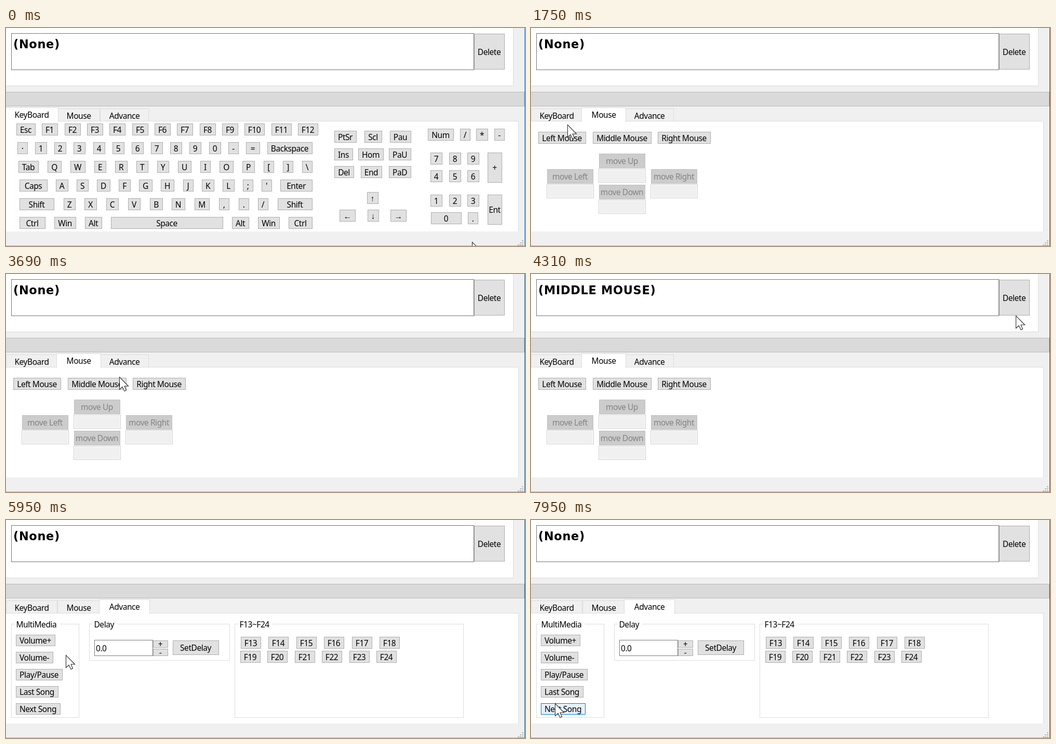
An HTML page that plays this animation: 999x420 px, repeating every 8000 ms.

```html
<!DOCTYPE html>
<html lang="en">
<head>
<meta charset="utf-8">
<title>Key mapping panel</title>
<style>
  html, body { margin: 0; width: 100%; height: 100%; overflow: hidden; background: #f0f0f0; }
  svg { display: block; }
  text { font: 15.5px "Noto Sans", "Open Sans", sans-serif; letter-spacing: -.45px; fill: #000; white-space: pre; }
  .mid { text-anchor: middle; }
  .off { fill: #838383; }
  #entry { font: bold 22.4px "DejaVu Sans", sans-serif; letter-spacing: .7px; }
  .hover > rect { fill: #e5f1fb; stroke: #0078d7; }
</style>
</head>
<body>
<svg id="stage" width="999" height="420" viewBox="0 0 999 420"></svg>
<script>
const stage = document.getElementById('stage');

function add(parent, tag, attrs = {}, content = '') {
  const el = document.createElementNS('http://www.w3.org/2000/svg', tag);
  for (const key in attrs) el.setAttribute(key, attrs[key]);
  el.textContent = content;
  return parent.appendChild(el);
}
const group = parent => add(parent, 'g');
const fill = (parent, x, y, width, height, color) =>
  add(parent, 'rect', { x, y, width, height, fill: color });
const box = (parent, x, y, w, h, color, stroke) =>
  add(parent, 'rect', { x: x + .5, y: y + .5, width: w - 1, height: h - 1, fill: color, stroke });
const label = (parent, x, y, str, cls = '') => add(parent, 'text', { x, y, class: cls }, str);

function button(parent, x, y, w, h, str, disabled) {
  const g = group(parent);
  box(g, x, y, w, h, disabled ? '#cccccc' : '#e1e1e1', disabled ? '#bfbfbf' : '#adadad');
  label(g, x + w / 2 - .5, y + h / 2 + 6, str, disabled ? 'mid off' : 'mid');
  return g;
}

// A key is as wide as its label plus padding.
const probe = label(stage, 0, -20, '');
function keyWidth(str) {
  probe.textContent = str;
  return Math.max(20, Math.round(probe.getComputedTextLength()) + 15);
}

// Spreads keys evenly from x to end; "label:width" sets a wider key.
function row(parent, x, end, y, keys, separator = ' ') {
  const list = keys.split(separator).map(key => {
    const [, str, width] = key.match(/^(.+?)(?::(\d+))?$/);
    return { str, w: width ? +width : keyWidth(str) };
  });
  const used = list.reduce((sum, key) => sum + key.w, 0);
  const gap = (end - x - used) / Math.max(1, list.length - 1);
  return list.map(({ str, w }) => {
    const key = button(parent, Math.round(x), y, w, 23, str);
    x += w + gap;
    return key;
  });
}

function groupBox(parent, x, y, w, h, title) {
  box(parent, x, y, w, h, 'none', '#dcdcdc');
  fill(parent, x + 7, y, keyWidth(title) - 6, 1, '#fff');
  label(parent, x + 9.5, y + 7, title);
}

// Window
fill(stage, 0, 0, 999, 420, '#f0f0f0');
box(stage, -2, -2, 979, 114, '#fff', '#dcdcdc');
box(stage, 10, 10, 891, 71, '#fff', '#747474');
const entry = add(stage, 'text', { id: 'entry', x: 14, y: 39 });
const del = button(stage, 901, 11, 59, 69, 'Delete');
box(stage, -2, 123, 1000, 28, '#dadada', '#b9b9b9');
box(stage, -2, 179, 989, 230, '#fff', '#dcdcdc');
fill(stage, 0, 392, 998, 28, '#f0f0f0');
fill(stage, 0, 419, 998, 1, '#b4b4b4');
const edge = fill(stage, 998, 0, 1, 420, '#3f82b8');
for (let r = 0; r < 3; r++)
  for (let c = 0; c <= r; c++) fill(stage, 993 - 4 * c, 409 + 4 * r, 3, 2, '#b8b8b8');

// Each view holds the tab strip and the page it selects.
const tabNames = ['KeyBoard', 'Mouse', 'Advance'];
const tabEdges = [0, 99, 181, 275];
function makeView(selected) {
  const g = group(stage);
  const tab = i => {
    const on = i === selected, left = tabEdges[i], width = tabEdges[i + 1] - left;
    if (on) {
      box(g, left - 2, 153, width + 4, 28, '#fff', '#dcdcdc');
      fill(g, left - 1, 179, width + 2, 2, '#fff');
    } else {
      box(g, left, 155, width, 25, '#f0f0f0', '#dcdcdc');
    }
    label(g, left + width / 2, on ? 173 : 175, tabNames[i], 'mid');
  };
  [0, 1, 2].filter(i => i !== selected).forEach(tab);
  tab(selected);
  return g;
}
const views = [0, 1, 2].map(makeView);
const [keyboard, mouse, advance] = views;

// Keyboard page
const functionKeys = (from, count) => Array.from({ length: count }, (_, i) => 'F' + (from + i)).join(' ');
[
  'Esc ' + functionKeys(1, 12),
  '· 1 2 3 4 5 6 7 8 9 0 - =:27 Backspace',
  'Tab Q W E R T Y U I O P [ ] \\',
  "Caps:54 A S D F G H J K L ; ' Enter:62",
  'Shift:67 Z X C V B N M , . / Shift:67',
  'Ctrl:50 Win Alt Space:216 Alt Win Ctrl:46'
].forEach((keys, i) => row(keyboard, 20 + Math.min(6, 2 * i), i ? 590 : 601, 184 + 36 * i, keys));
['PtSr Scl Pau', 'Ins Hom PaU', 'Del End PaD']
  .forEach((keys, i) => row(keyboard, 632, 780, 198 + 34 * i, keys));
row(keyboard, 695, 718, 316, '↑');
row(keyboard, 642, 771, 350, '←:31 ↓ →:31');
row(keyboard, 812, 960, 194, 'Num / * -');
row(keyboard, 817, 911, 240, '7 8 9');
row(keyboard, 817, 911, 274, '4 5 6');
row(keyboard, 817, 911, 321, '1 2 3');
row(keyboard, 818, 909, 355, '0:59 .');
button(keyboard, 927, 240, 28, 58, '+');
button(keyboard, 927, 321, 28, 58, 'Ent');

// Mouse page
const [leftMouse, middleMouse] = row(mouse, 14, 346, 200, 'Left Mouse|Middle Mouse|Right Mouse', '|');
['Up', 'Left', 'Down', 'Right'].forEach((dir, i) => {
  const angle = (i + 1) * Math.PI / 2;
  const x = 131 + 100 * Math.round(Math.cos(angle)), y = 272 - 30 * Math.round(Math.sin(angle));
  button(mouse, x, y, 89, 28, 'move ' + dir, true);
  box(mouse, x - 1, y + 29, 91, 27, '#fff', '#cccccc');
  fill(mouse, x + 1, y + 31, 87, 23, '#f0f0f0');
});

// Advance page
groupBox(advance, 10, 200, 131, 181, 'MultiMedia');
const media = ['Volume+', 'Volume-', 'Play/Pause', 'Last Song', 'Next Song']
  .map((str, i) => button(advance, 19, 221 + 33 * i, keyWidth(str), 22, str));
groupBox(advance, 160, 200, 271, 71, 'Delay');
box(advance, 170, 231, 113, 31, '#fff', '#7a7a7a');
label(advance, 173, 253, '0.0');
button(advance, 283, 232, 29, 14, '+');
button(advance, 283, 248, 29, 14, '-');
button(advance, 321, 232, 89, 28, 'SetDelay');
groupBox(advance, 440, 200, 441, 181, 'F13~F24');
row(advance, 452, 758, 225, functionKeys(13, 6));
row(advance, 451, 752, 252, functionKeys(19, 6));

probe.remove();
const pointer = add(stage, 'path', {
  d: 'M.5 .5V24.5L6 19.5L10 27.5L13.5 26L10 18H17.5Z',
  fill: '#fff', stroke: '#2a2a35', 'stroke-width': 1.1
});

// The pointer rests at each stop from arrive to leave and clicks what is there.
const LOOP = 8000, HOVER_LAG = 100, CLICK_LAG = 150;
const stop = (arrive, leave, x, y, target, effect) => ({ arrive, leave, x, y, target, effect });
const stops = [
  stop(0, 70, 897, 412, null, { page: 0, text: '(None)' }),
  stop(760, 780, 36, 100),
  stop(1000, 1300, 130, 164, null, { page: 1 }),
  stop(1750, 1750, 70, 186),
  stop(2050, 2170, 64, 210, leftMouse, { text: '(LEFT MOUSE)' }),
  stop(2720, 2980, 925, 55, del, { text: '(None)' }),
  stop(3640, 3850, 218, 198, middleMouse, { text: '(MIDDLE MOUSE)' }),
  stop(4260, 4720, 933, 80, del, { text: '(None)' }),
  stop(5480, 5500, 222, 168, null, { page: 2 }),
  stop(6218, 6380, 66, 302, media[2], { text: '(PALY/PAUSE)' }),
  stop(7150, 7550, 930, 66, del, { text: '(None)' }),
  stop(7850, LOOP, 46, 353, media[4])
];

const ease = k => k * k * (3 - 2 * k);

function pointerAt(t) {
  const i = stops.findIndex(s => t < s.leave), to = stops[i];
  if (t >= to.arrive) return [to.x, to.y];
  const from = stops[i - 1];
  const k = ease((t - from.leave) / (to.arrive - from.leave));
  return [from.x + (to.x - from.x) * k, from.y + (to.y - from.y) * k].map(Math.round);
}

function stateAt(t) {
  const done = stops.filter((s, i) => i === 0 || t >= s.arrive + CLICK_LAG);
  return Object.assign({}, ...done.map(s => s.effect));
}

function render(t) {
  const { page, text } = stateAt(t);
  views.forEach((view, i) => view.style.display = i === page ? '' : 'none');
  entry.textContent = text;
  edge.setAttribute('fill', page ? '#1f5f83' : '#3f82b8');
  const targets = stops.filter(s => s.target);
  targets.forEach(s => s.target.removeAttribute('class'));
  targets.filter(s => t >= s.arrive + HOVER_LAG && t < s.leave)
    .forEach(s => s.target.setAttribute('class', 'hover'));
  pointer.setAttribute('transform', `translate(${pointerAt(t)})`);
}

const start = performance.now();
function frame() {
  render((performance.now() - start) % LOOP);
  requestAnimationFrame(frame);
}
frame();
</script>
</body>
</html>
```
